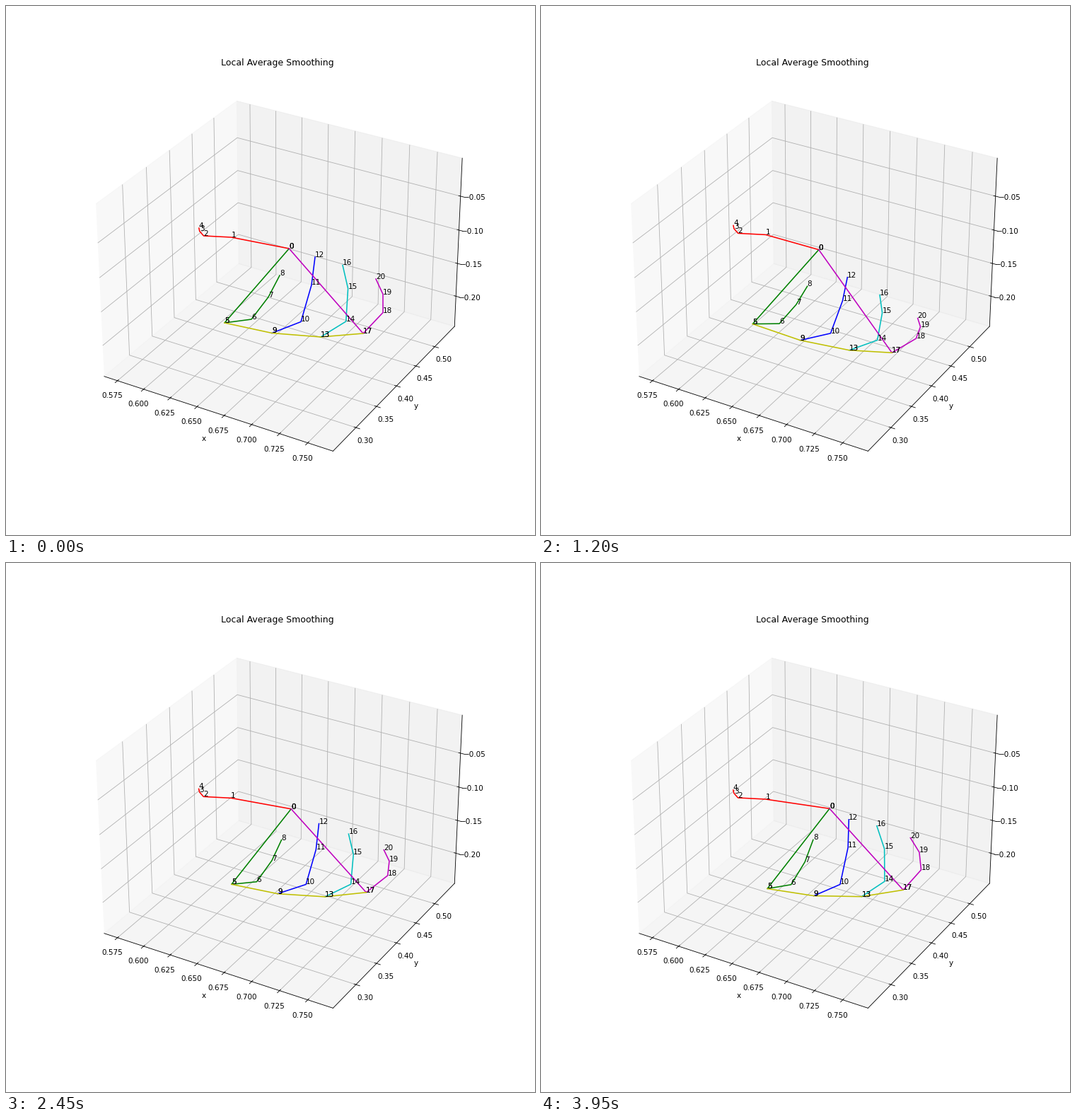
Recreate the animation shown at these times as a matplotlib script. Size 748x748 px, loop 4000 ms.

```python
import matplotlib.pyplot as plt
import numpy as np
from matplotlib.animation import FuncAnimation

SIZE, INCHES = 748, 10
FRAMES, STEP = 80, 50

CHAINS = [
    ("r", [0, 1, 2, 3, 4]),
    ("g", [0, 5, 6, 7, 8]),
    ("b", [9, 10, 11, 12]),
    ("c", [13, 14, 15, 16]),
    ("m", [0, 17, 18, 19, 20]),
    ("y", [5, 9, 13, 17]),
]

# Stage pixels as x + yj, y downwards; fingers run from knuckle to tip.
WRIST = 400.3 + 343j
THUMB = [318.5 + 327j, 279.5 + 325j, 273.8 + 318.5j, 272.8 + 314j]
FINGERS = [
    [309 + 448j, 347 + 443j, 371 + 411.5j, 387 + 381j],
    [376 + 462.5j, 417 + 446.5j, 432 + 394.5j, 437 + 355j],
    [445 + 468j, 480.7 + 446j, 483.6 + 399.5j, 476 + 366.5j],
    [505 + 463j, 533 + 433.5j, 533 + 407.5j, 523 + 386j],
]

# Gestures: wrist and thumb offset, knuckle shift, then its change per finger
# (fan), per joint (curl) and per both (twist).
REST = np.zeros(6, complex)
LOWER = np.array([-7 + 1.5j, -2 - 2.6j, -11.4 + 1.9j, 1.2 + 8j, 0.9 + 6.1j, 0.9 + 0.6j])
SPREAD = np.array([-8 + 2j, 1.3 - 5j, -5.7 + 1.6j, -1.4 + 9j, -2.5 + 1.5j, 4.4 + 3.5j])
RAISE = np.array([5 + 5.7j, -1 + 7j, 11 + 14.3j, -1.3 - 5.1j, -3.5 + 1.3j, 1.3 + 1j])
TURN = np.array([-2 + 3j, 1 + 1.4j, 4.7 - 3.2j, -2.2 + 5.6j, -1.7 + 1.2j, 2.6 + 2.4j])
SETTLE = np.array([2 + 4j, 5.5j, 6.8 + 8.7j, -1, -4.7 - 0.2j, 2.1 + 1.8j])
FINISH = np.array([7.7 + 4.3j, -1 + 7j, 11 + 12.5j, -1.3 - 4.4j, -4.4 - 0.7j, 0.6 + 0.6j])

KEYS = {
    0: REST,
    550: 0.28 * LOWER,
    800: LOWER,
    1100: 0.8 * LOWER + 0.2 * SPREAD,
    1600: SPREAD,
    2100: RAISE,
    2850: TURN,
    3300: SETTLE,
    3950: FINISH,
}
TIMES = np.array(list(KEYS), float)
MOVES = np.array(list(KEYS.values()))
SLOPES = np.gradient(MOVES, TIMES, axis=0)


def gesture(ms):
    """Smooth cubic path through the key gestures."""
    i = min(np.searchsorted(TIMES, ms, side="right") - 1, len(TIMES) - 2)
    span = TIMES[i + 1] - TIMES[i]
    u = (ms - TIMES[i]) / span
    base = MOVES[i] + (MOVES[i + 1] - MOVES[i]) * u * u * (3 - 2 * u)
    return base + span * u * (1 - u) * ((1 - u) * SLOPES[i] - u * SLOPES[i + 1])


def pose(ms):
    """The 21 joints in figure fractions."""
    wrist, thumb, shift, fan, curl, twist = gesture(ms)
    finger, joint = np.mgrid[0:4, 0:4]
    bend = shift + fan * finger + curl * joint + twist * finger * joint
    pts = np.concatenate([[WRIST + wrist], np.array(THUMB) + thumb,
                          (np.array(FINGERS) + bend).ravel()])
    return np.column_stack([pts.real, SIZE - pts.imag]) / SIZE


fig = plt.figure(figsize=(INCHES, INCHES), dpi=SIZE / INCHES)
ax = fig.add_subplot(projection="3d")
ax.set_title("Local Average Smoothing")
ax.set(xlabel="x", ylabel="y")
ax.set_xticks(np.arange(0.575, 0.76, 0.025))
ax.set_yticks(np.arange(0.30, 0.51, 0.05))
ax.set_zticks(np.arange(-0.20, -0.04, 0.05))
ax.set_xlim(0.5622, 0.7721)
ax.set_ylim(0.2460, 0.5541)
ax.set_zlim(-0.24676, 0.00503)

lines, labels = [], []
for color, joints in CHAINS:
    line = plt.Line2D([], [], color=color, lw=1.5, transform=fig.transFigure)
    lines.append((fig.add_artist(line), joints))
    # shared joints carry one label per chain
    labels += [(fig.text(0, 0, str(j)), j) for j in joints]


def update(frame):
    pts = pose(frame * STEP)
    for line, joints in lines:
        line.set_data(*pts[joints].T)
    for label, j in labels:
        label.set_position(pts[j])
    return [artist for artist, _ in lines + labels]


anim = FuncAnimation(fig, update, frames=FRAMES, interval=STEP,
                     repeat=True, repeat_delay=0, blit=False)
plt.show()
```
